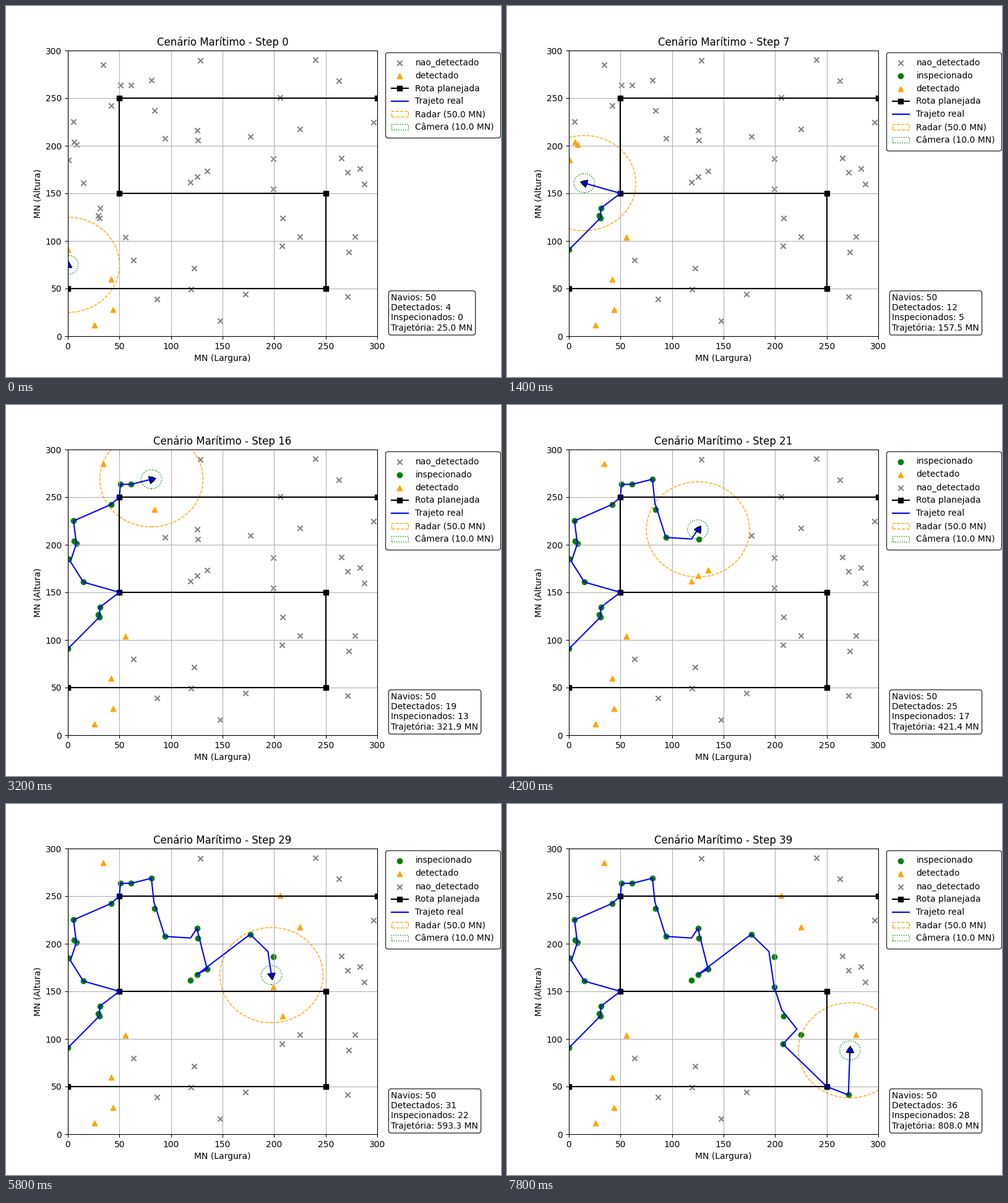
A matplotlib script for the animation above (8 s loop, 800 by 600 pixels).

```python
import numpy as np
import matplotlib.pyplot as plt
from matplotlib.animation import FuncAnimation

STEPS, INTERVAL = 40, 200
SIZE = 300
RADAR, CAMERA, SPEED = 50.0, 10.0, 25.0

SHIPS = np.random.RandomState(1).rand(50, 2) * SIZE
ROUTE = np.array([(0, 50), (250, 50), (250, 150), (50, 150), (50, 250), (300, 250)], float)

STATUS = ("nao_detectado", "detectado", "inspecionado")
STYLE = {
    "nao_detectado": dict(color="gray", marker="x"),
    "detectado": dict(color="orange", marker="^"),
    "inspecionado": dict(color="green", marker="o"),
}


def distance(points, pos):
    return np.hypot(*(points - pos).T)


def simulate():
    """Greedy patrol: always head for the nearest open ship or waypoint."""
    pos, total = ROUTE[0], 0.0
    path = [pos]
    state = np.where(distance(SHIPS, pos) <= RADAR, 1, 0)
    visited = np.arange(len(ROUTE)) == 0
    history = []
    for _ in range(STEPS):
        targets = np.vstack([SHIPS[state < 2], ROUTE[~visited]])
        gaps = distance(targets, pos)
        k = gaps.argmin()
        move = (targets[k] - pos) * min(1, SPEED / gaps[k])
        pos = pos + move
        total += np.hypot(*move)
        path.append(pos)
        visited |= distance(ROUTE, pos) < 1e-6
        reach = distance(SHIPS, pos)
        state = np.maximum(state, np.where(reach <= RADAR, 1, 0))
        state = np.where(reach <= CAMERA, 2, state)
        heading = np.degrees(np.arctan2(move[1], move[0]))
        history.append((np.array(path), state, heading, total))
    return history


HISTORY = simulate()
fig, ax = plt.subplots(figsize=(8, 6), dpi=100)
fig.subplots_adjust(right=0.75)


def update(step):
    path, state, heading, total = HISTORY[step]
    pos = path[-1]
    ax.clear()

    # legend entries follow the order in which states first occur
    for code in dict.fromkeys(state):
        name = STATUS[code]
        ax.scatter(*SHIPS[state == code].T, label=name, **STYLE[name])
    ax.plot(*ROUTE.T, "k-s", label="Rota planejada")
    ax.plot(*path.T, "b-", label="Trajeto real")
    ax.scatter(*pos, s=100, marker=(3, 0, heading - 90), color="blue",
               edgecolors="black", zorder=3)
    for radius, color, dash, name in ((RADAR, "orange", "--", "Radar"),
                                      (CAMERA, "green", ":", "Câmera")):
        ax.add_patch(plt.Circle(pos, radius, fill=False, color=color, ls=dash,
                                label=f"{name} ({radius} MN)"))

    ax.set(xlim=(0, SIZE), ylim=(0, SIZE), xlabel="MN (Largura)", ylabel="MN (Altura)",
           title=f"Cenário Marítimo - Step {step}")
    ax.grid(True)

    legend = ax.legend(loc="upper left", bbox_to_anchor=(1.02, 1), edgecolor="black")
    legend.get_frame().set_boxstyle("round", pad=0.3)
    info = (f"Navios: {len(SHIPS)}\nDetectados: {(state > 0).sum()}\n"
            f"Inspecionados: {(state == 2).sum()}\nTrajetória: {total:.1f} MN")
    ax.text(1.045, 0.013, info, transform=ax.transAxes, va="bottom",
            bbox=dict(boxstyle="round", facecolor="white", alpha=0.8))


anim = FuncAnimation(fig, update, frames=STEPS, init_func=lambda: None,
                     interval=INTERVAL, repeat=True, repeat_delay=0)
plt.show()
```
